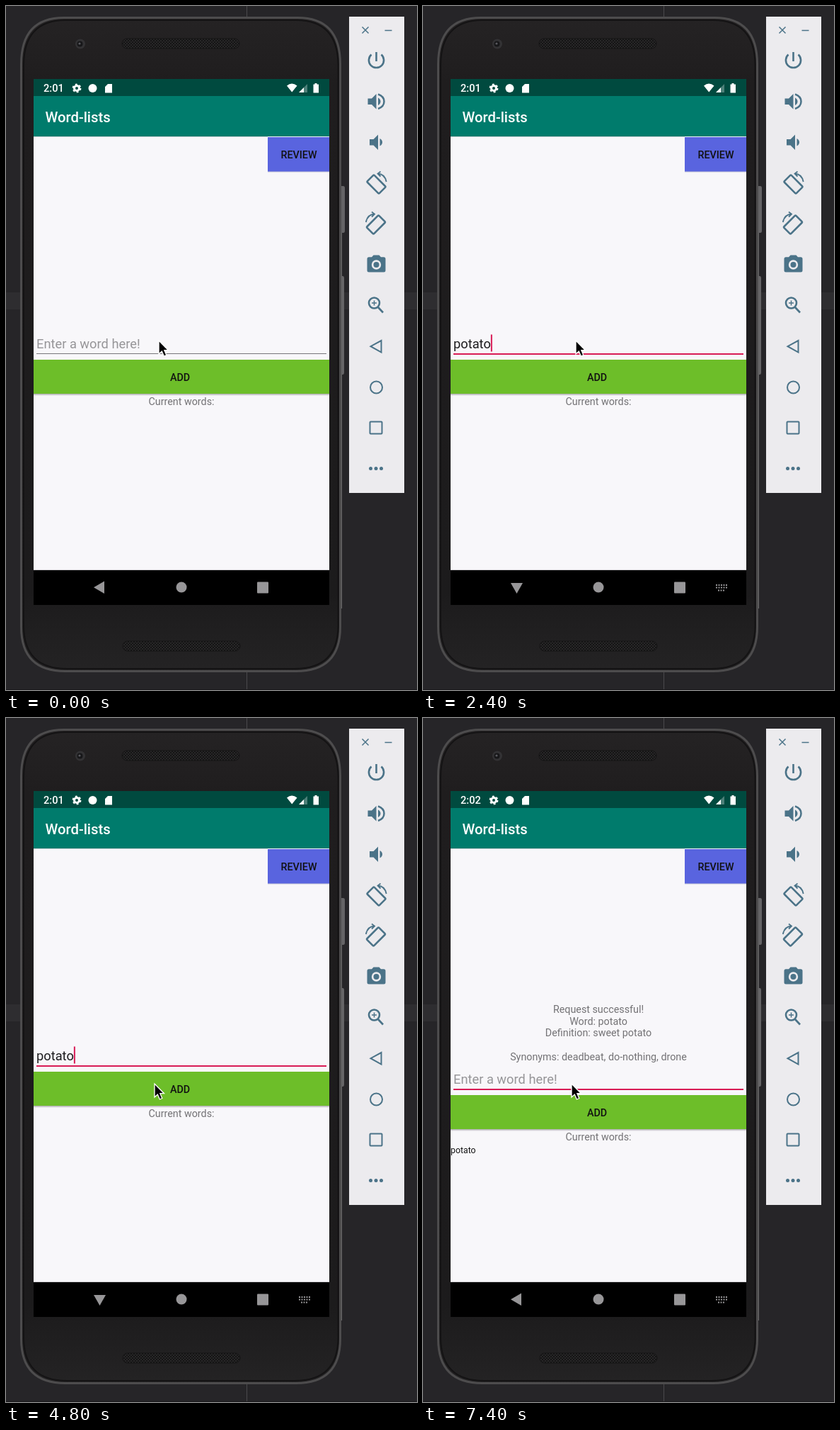
Animation of 581x965 px, one loop 8000 ms. Source, as an HTML page:

```html
<!DOCTYPE html>
<html lang="en">
<head>
<meta charset="utf-8">
<title>Word-lists</title>
<style>
  html, body { margin: 0; width: 100%; height: 100%; overflow: hidden; background: #262528; }
  svg { display: block; width: 581px; height: 965px; font: 14.3px Roboto, sans-serif; }
  .medium { font-weight: 500; }
  .mid { text-anchor: middle; }
  .note { fill: #737275; }
  .input { font-size: 18.3px; }
  .line { fill: none; stroke: #4b7388; stroke-width: 2; }
  .solid { fill: #4b7388; fill-rule: evenodd; }
</style>
</head>
<body>
<svg viewBox="0 0 581 965">
  <defs>
    <linearGradient id="body" x2="0" y2="1">
      <stop stop-color="#252324"/><stop offset=".1" stop-color="#1f1d1e"/>
      <stop offset=".88" stop-color="#1c1b1c"/><stop offset="1" stop-color="#242324"/>
    </linearGradient>
    <pattern id="mesh" width="4" height="4" patternUnits="userSpaceOnUse">
      <rect width="4" height="4" fill="#282728"/>
      <circle cx="1" cy="1" r="1.1" fill="#111"/><circle cx="3" cy="3" r="1.1" fill="#111"/>
    </pattern>
    <linearGradient id="shade" x2="0" y2="1">
      <stop stop-opacity=".32"/><stop offset="1" stop-opacity="0"/>
    </linearGradient>
    <g id="rotate">
      <rect x="-12" y="-7" width="24" height="14" rx="1.5" transform="translate(0 1.5) rotate(45)"/>
      <path d="M2-13.5Q12-13 14.2-2M6-16.5 2-13.5 6-9.5" stroke-width="1.8"/>
    </g>
  </defs>

  <!-- desktop -->
  <rect width="581" height="965" fill="#262528"/>
  <rect y="404" width="581" height="24" fill="#2e2d30"/>
  <path d="M340.5 0V16M340.5 940V965" stroke="#4a494c"/>
  <path d="M0 964.5H581" stroke="#1a191b"/>

  <!-- phone -->
  <path d="M474 254h3q2 0 2 3v60q0 3-2 3h-3zM474 381h2q2 0 2 3v133q0 3-2 3h-2z" fill="#656466"/>
  <path id="shell" d="M21.5 82Q21.5 16.5 82 16.5H412Q472.5 16.5 472.5 82V876Q472.5 938.5 410 938.5H84Q21.5 938.5 21.5 876Z" fill="url(#body)" stroke="#4d4c4d" stroke-width="3"/>
  <path d="M25 84Q25 20 84 20H410Q469.500 20 469.500 84V874Q469.500 935 408 935H86Q25 935 25 874Z" fill="none" stroke="#141314" stroke-width="2"/>
  <path d="M474.500 320V850" stroke="#6a696a"/>
  <rect x="164" y="46" width="166" height="14" rx="7" fill="url(#mesh)" stroke="#151415"/>
  <rect x="165" y="896" width="166" height="14" rx="7" fill="url(#mesh)" stroke="#151415"/>
  <circle cx="105" cy="53.500" r="7" fill="#333234"/>
  <circle cx="104.500" cy="53.500" r="4" fill="#171719"/>
  <circle cx="104" cy="53" r="1.600" fill="#59595f"/>

  <!-- screen -->
  <rect x="39" y="103" width="418" height="742"/>
  <rect x="39" y="184" width="418" height="612" fill="#f8f7fa"/>
  <rect x="39" y="127" width="418" height="57" fill="#007b6c"/>
  <rect x="39" y="103" width="418" height="24" fill="#004a3f"/>
  <path d="M39 184.500H370M39 795.500H457" stroke="#d0cfd2"/>
  <g fill="#fff">
    <text id="clock" class="medium" x="53" y="121" font-size="14.600"></text>
    <circle cx="100" cy="116" r="3.500" fill="none" stroke="#fff" stroke-width="3"/>
    <circle cx="100" cy="116" r="5.400" fill="none" stroke="#fff" stroke-width="2" stroke-dasharray="2.827"/>
    <circle cx="122.500" cy="116" r="6"/>
    <path d="M144 110h6v12.500h-10v-8.500zM397 112.500Q404 106.500 411.500 112.500L404.200 121.500Z"/>
    <path d="M426 110v12h-12z" opacity=".3"/>
    <path d="M421 115v7h-7zM436.500 109h3v1.500h2.500v12h-7.500v-12h2z"/>
    <text class="medium" x="55.500" y="164" font-size="20.300">Word-lists</text>
  </g>
  <rect x="370" y="185" width="87" height="49" fill="#5964df"/>
  <path d="M370 234H457" stroke="#c9c9d4"/>
  <text class="medium mid" x="414" y="214.500" fill="#111">REVIEW</text>

  <g id="result" class="mid note">
    <text x="248" y="416">Request successful!</text>
    <text x="248" y="432.500">Word: potato</text>
    <text x="248" y="449">Definition: sweet potato</text>
    <text x="248" y="482.500">Synonyms: deadbeat, do-nothing, drone</text>
    <text x="39" y="613.500" font-size="12.300" fill="#111" text-anchor="start">potato</text>
  </g>

  <g id="form">
    <text id="hint" class="input" x="43" y="483" fill="#969598">Enter a word here!</text>
    <text id="typed" class="input" x="43" y="483" fill="#1d1c1e"></text>
    <rect id="underline" x="43" y="490" width="410"/>
    <rect id="caret" y="463.500" width="2" height="24" fill="#d81b55"/>
    <rect id="shadow" x="39" y="547" width="418" fill="url(#shade)"/>
    <rect x="39" y="499" width="418" height="48" fill="#6dbe29"/>
    <text class="medium mid" x="246" y="528.500" fill="#111">ADD</text>
    <text class="mid note" x="248" y="563">Current words:</text>
  </g>

  <g fill="#979698">
    <path id="back"/>
    <circle cx="248" cy="820" r="7.500"/>
    <rect x="355" y="812.500" width="16" height="16" rx="1"/>
    <path id="keys" d="M414 817H430M414 820.500H430M417 824.500H427" stroke="#979698" stroke-width="1.800" stroke-dasharray="2 1.500"/>
  </g>

  <!-- emulator controls -->
  <rect x="485" y="15" width="78" height="672" fill="#ecebee"/>
  <path class="line" style="stroke-width:1.500" d="M503.500 29.500l9 9M512.500 29.500l-9 9M535.500 34.500h10"/>
  <g class="line" style="stroke-width:2.600">
    <path d="M523.500 65V78M516.500 68.500A10.600 10.600 0 1 0 530.500 68.500"/>
    <use href="#rotate" x="523.500" y="250"/>
    <use href="#rotate" transform="translate(523 307) scale(-1 1)"/>
    <circle cx="520.500" cy="419" r="7.500"/>
    <path d="M525.500 424.500L533 432.500"/>
    <path d="M517 419h7M520.500 415.500v7" stroke-width="1.500"/>
  </g>
  <g class="solid">
    <path d="M511.500 130.500h5.500l6.500-6.500v21.500l-6.500-6.500h-5.500zM526 129.500q3.500 2 3.500 5.200t-3.500 5.300z"/>
    <path d="M514 188h5.500l6.500-6.500v21.500l-6.500-6.500h-5.500zM528.500 187q3.500 2 3.500 5.200t-3.500 5.300z"/>
    <path d="M519.500 351.500h8l2.500 2.700h4q2.500 0 2.500 2.500v16.300q0 2.500-2.500 2.500h-21q-2.500 0-2.500-2.500v-16.300q0-2.500 2.500-2.500h4zM516.800 365a6.700 6.700 0 1 0 13.400 0a6.700 6.700 0 1 0-13.400 0z"/>
    <circle cx="523.500" cy="365" r="4"/>
    <circle cx="515.500" cy="652.500" r="2.500"/><circle cx="523" cy="652.500" r="2.500"/><circle cx="530.500" cy="652.500" r="2.500"/>
  </g>
  <g class="line">
    <path d="M526 124.500q8.500 3 8.500 10.200t-8.500 10.300" stroke-width="2.500"/>
    <path d="M530.500 472V488.500L515.500 480.200Z"/>
    <circle cx="523.500" cy="538" r="8.500"/>
    <rect x="514.500" y="586.500" width="17" height="17" rx="1"/>
  </g>

  <path id="mouse" d="M0 0V19L4.300 15 7.300 22 10.800 20.500 7.800 13.700H13.500Z" stroke="#fff" stroke-width="1.300"/>
</svg>
<script>
  const LOOP = 8000, STEP = 200, WORD = "potato";
  const FOCUS = 1000, TYPED = 2400, PRESS = 3400, RELEASE = 4000, ADDED = 5000, MINUTE = 6600;
  const el = Object.fromEntries([...document.querySelectorAll("[id]")].map(e => [e.id, e]));
  const set = (e, attrs) => Object.entries(attrs).forEach(([k, v]) => e.setAttribute(k, v));
  const show = (e, on) => { e.style.display = on ? "" : "none"; };

  function typedLength(t) {
    if (t >= ADDED) return 0;
    if (t >= 2200) return t < TYPED ? 5 : 6;
    return Math.min(4, Math.max(0, Math.floor((t - FOCUS) / STEP)));
  }

  function caretOn(t) {
    if (t < FOCUS) return false;
    if (t < TYPED) return true;
    const [start, half] = t < ADDED ? [TYPED, 550] : [4850, 500];
    return Math.floor((t - start) / half) % 2 === 0;
  }

  function draw(t) {
    const focused = t >= FOCUS, added = t >= ADDED;
    const word = WORD.slice(0, typedLength(t));
    const pressed = t >= PRESS && t < RELEASE;

    el.clock.textContent = t < MINUTE ? "2:01" : "2:02";
    el.typed.textContent = word;
    show(el.hint, !word);
    show(el.result, added);
    set(el.form, { transform: `translate(0 ${added ? 33 : 0})` });
    set(el.underline, { height: focused ? 2 : 1, fill: focused ? "#d81b55" : "#77767a" });
    show(el.caret, caretOn(t));
    set(el.caret, { x: 43 + (word && el.typed.getComputedTextLength()) });
    set(el.shadow, { height: pressed ? 8 : 3 });
    set(el.back, { d: focused && !added ? "M124 814H141L132.500 829Z" : "M139 811.500V829L124 820.200Z" });
    show(el.keys, focused);

    const p = Math.min(1, Math.max(0, (t - 2600) / 600));
    set(el.mouse, { transform: `translate(${216 - 6 * p ** 4} ${472 + 44 * p ** 2.500})` });
  }

  function tick(now) {
    draw(Math.floor(now % LOOP / STEP) * STEP);
    requestAnimationFrame(tick);
  }
  requestAnimationFrame(tick);
</script>
</body>
</html>
```
